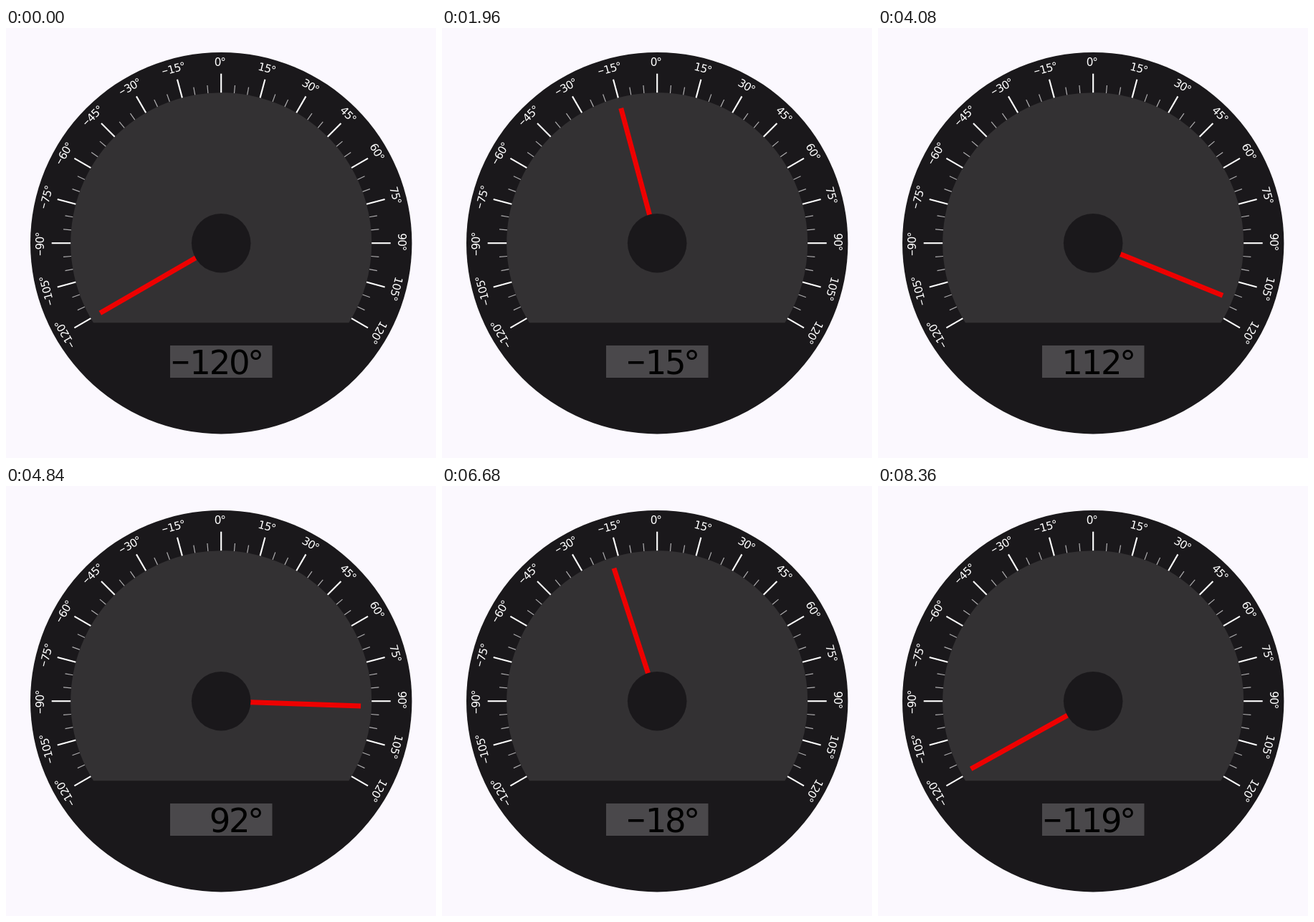
Recreate the animation shown at these times as an HTML page with a canvas. Size 600 by 600 pixels, loop 8.4 s.

```html
<!DOCTYPE html>
<html>
<head>
<meta charset="utf-8">
<style>
html, body { margin: 0; width: 100%; height: 100%; overflow: hidden; background: #fbf8fe; }
canvas { display: block; }
</style>
</head>
<body>
<canvas id="stage" width="600" height="600"></canvas>
<script>
const ctx = document.getElementById('stage').getContext('2d');
const LOOP = 8400, STEP = 40, C = 300.2;
const LIMIT = 120, SPEED = 0.06, PEAK = 125, PEAK_TIME = 4293;
const DARK = '#1a181b', FACE = '#333133';

// Distance in time from the peak, the short way round the loop
function fromPeak(t) {
  const d = Math.abs(t - PEAK_TIME);
  return Math.min(d, LOOP - d);
}

// A triangle wave in degrees, stopped at both ends of the scale
function angleAt(t) {
  const angle = Math.round(PEAK - SPEED * fromPeak(t));
  return Math.max(-LIMIT, Math.min(LIMIT, angle));
}

function disc(r, color) {
  ctx.fillStyle = color;
  ctx.beginPath();
  ctx.arc(C, C, r, 0, 2 * Math.PI);
  ctx.fill();
}

// Runs draw with the dial centre as origin and "up" turned to the angle
function turned(angle, draw) {
  ctx.save();
  ctx.translate(C, C);
  ctx.rotate(angle * Math.PI / 180);
  draw();
  ctx.restore();
}

function spoke(angle, from, to, width, color) {
  turned(angle, () => {
    ctx.fillStyle = color;
    ctx.fillRect(-width / 2, -to, width, to - from);
  });
}

// Fixed-pitch reading; right is the right edge of the last cell
function reading(value, right, baseline, size, color) {
  const pitch = 0.588 * size;
  const text = (value < 0 ? '\u2212' : '') + Math.abs(value) + '\u00b0';
  ctx.fillStyle = color;
  ctx.textAlign = 'center';
  [...text].reverse().forEach((ch, i) => {
    const family = ch === '\u2212' ? '"Noto Sans Mono", monospace' : '"DejaVu Sans", sans-serif';
    ctx.font = `${size}px ${family}`;
    const shift = ch === '\u00b0' ? -0.1 * size : 0;
    ctx.fillText(ch, right - (i + 0.5) * pitch + shift, baseline);
  });
}

function drawDial() {
  ctx.fillStyle = '#fbf8fe';
  ctx.fillRect(0, 0, 600, 600);
  disc(266.2, DARK);

  const end = Math.asin(111 / 210);
  ctx.fillStyle = FACE;
  ctx.beginPath();
  ctx.arc(C, C, 210, Math.PI - end, end);
  ctx.fill();

  for (let a = -LIMIT; a <= LIMIT; a += 5) {
    if (a % 15) {
      spoke(a, 210, 221, 1.2, '#b0afb1');
      continue;
    }
    spoke(a, 210, 236.5, 2.1, '#fff');
    const cells = String(a).length + 1;
    turned(a, () => reading(a, cells * 4.5, -246.9, 15.3, '#fff'));
  }

  ctx.fillStyle = '#4a484b';
  ctx.fillRect(229, 443, 142.5, 45);
}

function frame(now) {
  const t = Math.floor((now % LOOP) / STEP) * STEP;
  const angle = angleAt(t);
  drawDial();
  spoke(angle, 35, 195, 7, '#ee0000');
  disc(41.3, DARK);
  reading(angle, 367, 483, 46.6, '#000');
}

let start;
function tick(now) {
  start ??= now;
  frame(now - start);
  requestAnimationFrame(tick);
}
requestAnimationFrame(tick);
</script>
</body>
</html>
```
